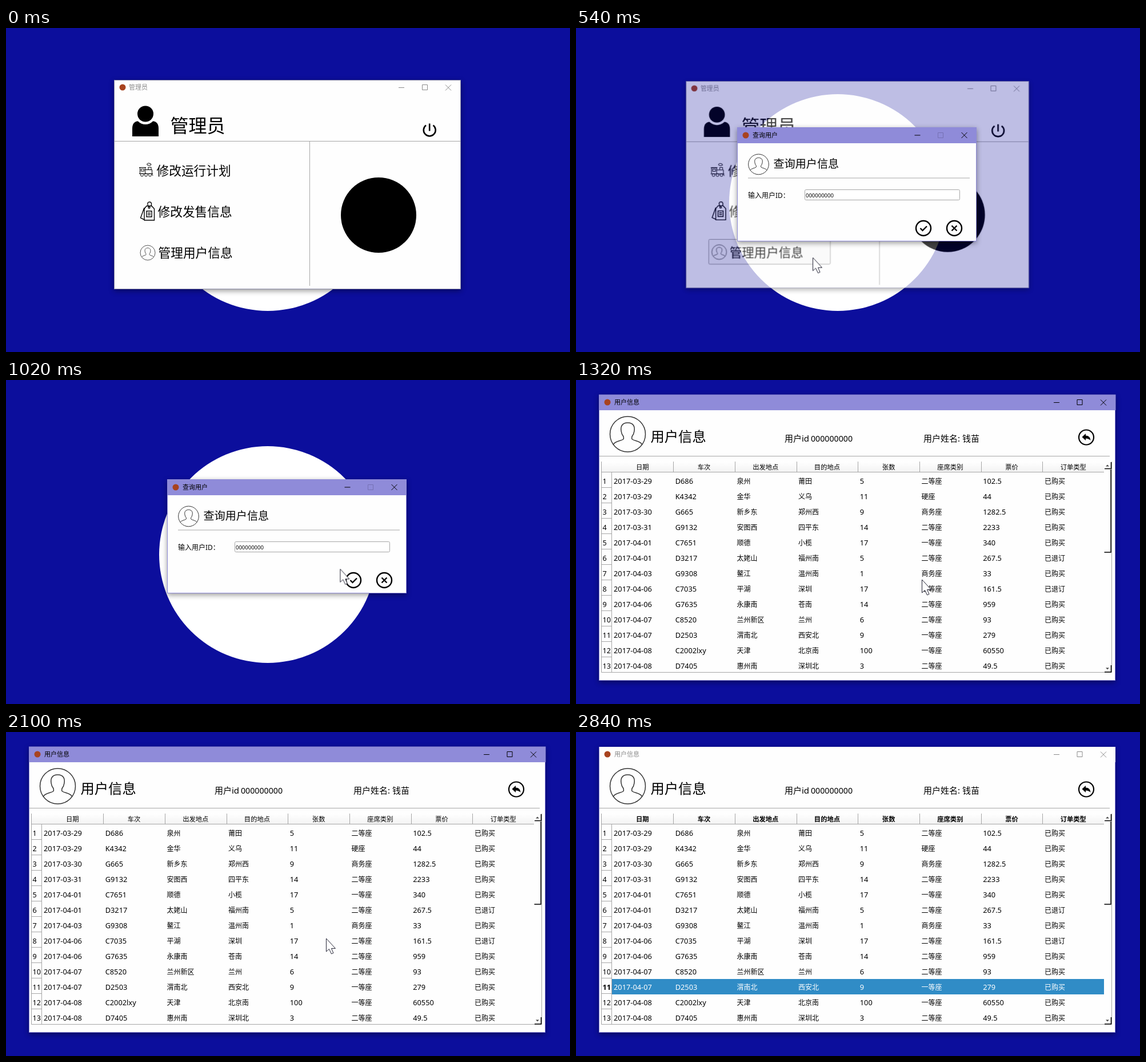
Animation, 987 px wide and 568 px high, one loop 2.86 s. Source, as an HTML page:

```html
<!DOCTYPE html>
<html lang="zh-CN">
<head>
<meta charset="utf-8">
<title>用户信息</title>
<style>
  html, body { margin: 0; width: 100%; height: 100%; overflow: hidden; background: #0c0e9c; }
  svg { display: block; }
  text { font-family: "Noto Sans", "Noto Sans CJK SC", "Noto Sans CJK", sans-serif; white-space: pre; }
  .win, .pointer, .hover, .bar, .chrome, .pick, .focus, .bold, .picked {
    animation: 2860ms linear infinite;
  }
  .win { filter: drop-shadow(0 3px 5px rgba(0, 0, 0, .4)); }
  .line { fill: none; stroke: #a6a6a6; }
  .pen { fill: none; stroke: currentColor; }
  .thin { vector-effect: non-scaling-stroke; }
  .grey { color: #8b8b8b; }

  #admin { transform-origin: 492.5px 274px; animation-name: close-admin; }
  #query { transform-origin: 491.5px 274px; animation-name: query; }
  #info { transform-origin: 492px 276px; animation-name: open-info; }
  .hover { animation-name: hover; animation-timing-function: step-end; }
  .bar, .chrome, .pick, .focus, .bold, .picked { animation-timing-function: step-end; }
  .bar { animation-name: bar; }
  .chrome { animation-name: chrome; }
  .pick { animation-name: pick; }
  .focus { animation-name: focus; }
  .bold { animation-name: bold; }
  .picked { animation-name: picked; }
  .pointer { animation-name: pointer; }

  @keyframes close-admin {
    0%, 18.182% { opacity: 1; transform: none; }
    20.979%, 100% { opacity: 0; transform: scale(.96); }
  }
  @keyframes query {
    0%, 15.385% { opacity: 0; transform: scale(.93); }
    18.182%, 44.056% { opacity: 1; transform: none; }
    46.1%, 100% { opacity: 0; transform: scale(.96); }
  }
  @keyframes open-info {
    0%, 43.5% { opacity: 0; transform: scale(.93); }
    46.1%, 100% { opacity: 1; transform: none; }
  }
  @keyframes hover { 0% { opacity: 0; } 12.587%, 100% { opacity: 1; } }
  @keyframes bar { 0% { opacity: 1; } 99.28%, 100% { opacity: 0; } }
  @keyframes chrome { 0% { color: #000; } 99.28%, 100% { color: #8b8b8b; } }
  @keyframes pick { 0% { opacity: 0; } 79.72%, 100% { opacity: 1; } }
  @keyframes focus { 0% { opacity: 0; } 79.72% { opacity: 1; } 99.28%, 100% { opacity: 0; } }
  @keyframes bold { 0% { font-weight: 400; } 79.72%, 100% { font-weight: 700; } }
  @keyframes picked { 0% { fill: #000; } 79.72%, 100% { fill: #fff; } }
  @keyframes pointer {
    0%, 4.5% { transform: translate(880px, 576px); }
    4.895% { transform: translate(866px, 556px); animation-timing-function: cubic-bezier(.3, .3, .4, 1); }
    13.986%, 18.881% { transform: translate(414px, 403px); }
    23.077%, 23.776% { transform: translate(421px, 347px); }
    30.07% { transform: translate(505px, 292px); }
    35.664% { transform: translate(584px, 331px); animation-timing-function: ease-out; }
    39.161%, 46.853% { transform: translate(605px, 350px); animation-timing-function: ease-in-out; }
    62.238%, 64.2% { transform: translate(562px, 183px); animation-timing-function: ease-in-out; }
    79.021%, 82.5% { transform: translate(559px, 436px); animation-timing-function: ease-in; }
    91.8% { transform: translate(849px, 568px); }
    92.308%, 100% { transform: translate(880px, 576px); }
  }
</style>
</head>
<body>
<svg width="987" height="568" viewBox="0 0 987 568">
  <defs>
    <linearGradient id="sheen" x2="0" y2="1">
      <stop stop-color="#fff"/><stop offset="1" stop-color="#f3f3f3"/>
    </linearGradient>
    <path id="min-close" class="pen" d="M-46 .5h10M36-4.5l10 10m0-10l-10 10"/>
    <path id="max" class="pen" d="M-4.5-4.5h9v9h-9z"/>
    <g id="person" class="pen">
      <circle class="thin" r="31"/>
      <path class="thin" d="M-25 18C-22 12-12 12-8 9C-6 7-7 4-10 0C-15-14-9-20 0-20C9-20 15-14 10 0C7 4 6 7 8 9C12 12 22 12 25 18"/>
    </g>
    <circle id="badge" r="5.5" fill="#a8431f"/>
  </defs>

  <rect width="987" height="568" fill="#0c0e9c"/>
  <circle cx="458" cy="306" r="190" fill="#fff"/>

  <g id="admin" class="win">
    <rect x="189.5" y="91.5" width="606" height="366" fill="#fefefe" stroke="#8d8da8"/>
    <use href="#badge" x="204" y="104"/>
    <g class="grey">
      <text x="215" y="108.2" font-size="11" fill="currentColor">管理员</text>
      <use href="#min-close" x="733" y="104"/>
      <use href="#max" x="733" y="104"/>
    </g>
    <path d="M221 190V176Q221 163 234 163H254Q267 163 267 176V190Z"/>
    <circle cx="244" cy="151" r="18" fill="#fefefe"/>
    <circle cx="244" cy="150.500" r="14"/>
    <text x="287.500" y="182.500" font-size="32">管理员</text>
    <path class="pen" stroke-width="2.6" d="M735 170.500a10.500 10.500 0 1 0 12.500 0M741.200 167.500v13"/>
    <path class="line" d="M190 198.500H795M531.500 199V452"/>
    <circle cx="652" cy="328" r="66"/>

    <g class="pen" stroke="#777">
      <path d="M234.500 255V244.500H243.500V255M233 244.500H245M236.500 247h5v4h-5zM243.500 248.500H255.500V255M249 248v-4h5v4M247 240q-1-3 3-3t4 3q-3 2-7 0M233 255.500H257M255 255l2 4"/>
      <circle cx="238" cy="257.500" r="2.500"/><circle cx="245" cy="257.500" r="2.500"/><circle cx="252" cy="257.500" r="2.500"/>
    </g>
    <g class="pen" stroke="#333" stroke-width="1.400">
      <path d="M242 317L246 312H255L259.500 317V337H242ZM242 315L235.500 333L242 336M246 321h9v10h-9zM248 324.500h5M248 327.500h5"/>
      <circle cx="250.500" cy="314.500" r="1.500"/>
      <path d="M249 313q-3-8 2-8t3 7"/>
    </g>
    <rect class="hover" x="229.500" y="371.500" width="215" height="44" rx="2" fill="#f8f8f8" stroke="#999"/>
    <use href="#person" transform="translate(248 394) scale(.42)" color="#555"/>
    <g font-size="21.700">
      <text x="263.500" y="258">修改运行计划</text>
      <text x="265.500" y="330">修改发售信息</text>
      <text x="266.500" y="402.300">管理用户信息</text>
    </g>
  </g>

  <g id="query" class="win">
    <rect x="282.500" y="174.500" width="418" height="199" fill="#fefefe" stroke="#8f8bd9"/>
    <rect x="282" y="174" width="419" height="28" fill="#8f8bd9"/>
    <use href="#badge" x="297" y="188"/>
    <text x="309" y="192.200" font-size="11">查询用户</text>
    <use href="#min-close" x="638.500" y="187.500"/>
    <use href="#max" x="638" y="188" color="#7570b4"/>
    <use href="#person" transform="translate(319.500 239) scale(.575)" color="#333"/>
    <text x="345.500" y="245.300" font-size="19.100">查询用户信息</text>
    <path class="line" d="M301 263H689"/>
    <text x="301" y="297.500" font-size="12">输入用户ID：</text>
    <rect x="400.500" y="283.500" width="271" height="18" rx="2" fill="#fff" stroke="#a6a6a6"/>
    <text x="402" y="296.500" font-size="9.500">000000000</text>
    <g class="pen" stroke-width="2.400">
      <circle cx="608" cy="351" r="13"/><circle cx="662" cy="351" r="13"/>
      <path d="M602.500 351l4 4 7.500-7.500M657.500 346.500l9 9m0-9l-9 9"/>
    </g>
  </g>

  <g id="info" class="win">
    <rect x="40.500" y="26.500" width="903" height="500" fill="#fefefe" stroke="#8f8bd9"/>
    <rect x="41" y="26" width="903" height="27" fill="#fefefe"/>
    <rect class="bar" x="40" y="25.500" width="904.500" height="27.500" fill="#8f8bd9"/>
    <use href="#badge" x="55" y="39"/>
    <g class="chrome">
      <text x="67" y="43.200" font-size="11" fill="currentColor">用户信息</text>
      <use href="#min-close" x="882" y="39"/>
      <use href="#max" x="881.500" y="39"/>
    </g>
    <use href="#person" transform="translate(90.500 95)" color="#333" stroke-width="1.500"/>
    <text x="130.500" y="108.300" font-size="24.300">用户信息</text>
    <text x="365" y="107.500" font-size="15">用户id</text>
    <text x="411" y="107.500" font-size="14.200">000000000</text>
    <text x="608" y="107.500" font-size="15">用户姓名: 钱苗</text>
    <circle class="pen" cx="893" cy="100.500" r="13" stroke-width="2.200"/>
    <path d="M885.500 100L892 94V97.500Q900 97.500 900.500 106Q897.500 102.500 892 102.500V106Z"/>
    <path class="line" d="M41 133.500H934"/>
    <rect x="45" y="143" width="879" height="18" fill="url(#sheen)"/>
    <rect class="pick" x="63" y="433" width="861" height="27" fill="#308cc6"/>
    <rect class="focus" x="495.500" y="433.500" width="106" height="26" fill="none" stroke="#2a7db2"/>
    <g id="table"></g>
    <path class="line" stroke="#c4c4c4" d="M44.500 143V512.500H937.500V143"/>
    <path class="pen" stroke="#777" stroke-width="1.500" d="M925 155.500H936.500V144M924.500 302H936V157M925 512H936.500V500"/>
    <path d="M927 151.500l3-3 3 3zM927 504.500l3 3 3-3z" fill="#444"/>
  </g>

  <path class="pointer" d="M.5 0V23L5.500 18.500L9.500 27L13 25.500L9.500 17.500H16.500Z" fill="#fff" stroke="#223"/>
</svg>
<script>
  const heads = '日期 车次 出发地点 目的地点 张数 座席类别 票价 订单类型'.split(' ');
  const rows = `2017-03-29 D686 泉州 莆田 5 二等座 102.5 已购买
2017-03-29 K4342 金华 义乌 11 硬座 44 已购买
2017-03-30 G665 新乡东 郑州西 9 商务座 1282.5 已购买
2017-03-31 G9132 安图西 四平东 14 二等座 2233 已购买
2017-04-01 C7651 顺德 小榄 17 一等座 340 已购买
2017-04-01 D3217 太姥山 福州南 5 二等座 267.5 已退订
2017-04-03 G9308 鳌江 温州南 1 商务座 33 已购买
2017-04-06 C7035 平湖 深圳 17 二等座 161.5 已退订
2017-04-06 G7635 永康南 苍南 14 二等座 959 已购买
2017-04-07 C8520 兰州新区 兰州 6 二等座 93 已购买
2017-04-07 D2503 渭南北 西安北 9 一等座 279 已购买
2017-04-08 C2002lxy 天津 北京南 100 一等座 60550 已购买
2017-04-08 D7405 惠州南 深圳北 3 二等座 49.5 已购买`.split('\n').map(row => row.split(' '));
  const selected = 10, pitch = 27, width = 107.7;
  const left = col => 62.5 + col * width;
  const label = (x, y, size, str, attrs = '') =>
    `<text x="${x}" y="${y}" font-size="${size}" ${attrs}>${str}</text>`;

  let lines = 'M45 161.5H924M62.5 162V512', texts = '';
  heads.forEach((head, col) => {
    if (col) lines += `M${Math.round(left(col)) + .5} 143V161`;
    texts += label(left(col) + width / 2, 157.3, 11.3, head, 'class="bold" text-anchor="middle"');
  });
  rows.forEach((row, i) => {
    const y = 181.6 + i * pitch, active = i === selected;
    if (i) lines += `M45 ${161.5 + i * pitch}H62`;
    texts += label(46.5, y, 12.6, i + 1, active ? 'class="bold"' : '');
    row.forEach((cell, col) => {
      const size = /^[\x20-\x7e]+$/.test(cell) ? 12.8 : 12;
      texts += label(left(col) + 3.5, y, size, cell, active ? 'class="picked"' : '');
    });
  });
  document.getElementById('table').innerHTML =
    `<path class="line" stroke="#c4c4c4" d="${lines}"/>${texts}`;
</script>
</body>
</html>
```
